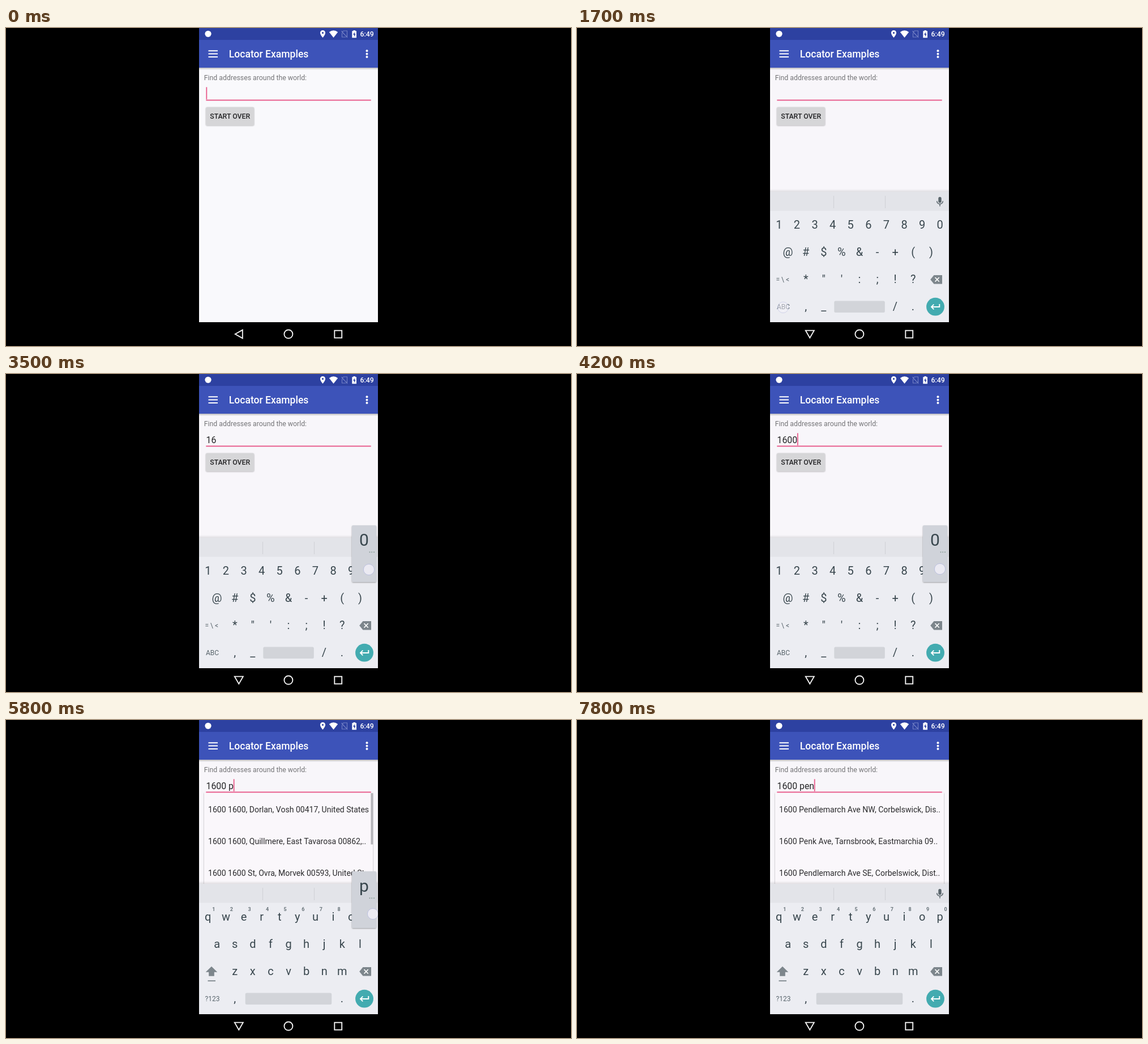
An HTML page that plays this animation: 998x561 px, repeating every 8000 ms.

```html
<!DOCTYPE html>
<html lang="en">
<head>
<meta charset="utf-8">
<title>Address search</title>
<style>
  html, body { margin: 0; width: 100%; height: 100%; overflow: hidden; background: #000; }
  svg { display: block; }
  text { font-family: Roboto, sans-serif; white-space: pre; }
  .mid { text-anchor: middle; }
  .key { font-size: 20px; fill: #38464d; }
  .small { font-size: 12px; fill: #59656c; }
  .hint { font-size: 9px; font-weight: 700; fill: #69747a; }
  .row { font-size: 14.04px; fill: #2b2b2d; }
</style>
</head>
<body>
<svg id="stage" width="998" height="561" viewBox="0 0 998 561">
  <defs>
    <clipPath id="phone"><rect x="341" width="316" height="561"/></clipPath>
    <clipPath id="listClip"><rect x="341" y="126" width="316" height="163"/></clipPath>
    <clipPath id="keyClip"><rect x="341" y="270" width="316" height="249"/></clipPath>
    <linearGradient id="down" x2="0" y2="1">
      <stop stop-opacity=".25"/><stop offset="1" stop-opacity="0"/>
    </linearGradient>
    <linearGradient id="up" x2="0" y2="1">
      <stop stop-opacity="0"/><stop offset="1" stop-opacity=".1"/>
    </linearGradient>
    <filter id="shadow" x="-20%" y="-20%" width="140%" height="140%">
      <feDropShadow dx="0" dy="1" stdDeviation="1.2" flood-opacity=".35"/>
    </filter>
  </defs>
  <g clip-path="url(#phone)">
    <rect id="page" x="341" y="70" width="316" height="449"/>
    <rect x="341" y="70" width="316" height="4" fill="url(#down)"/>
    <rect x="341" y="20" width="316" height="50" fill="#3d53b9"/>
    <rect x="341" width="316" height="21" fill="#2d41a1"/>

    <g fill="#fff">
      <circle cx="357" cy="10.3" r="5.6"/>
      <path fill-rule="evenodd" d="M559.5 4a4.6 4.6 0 0 0-4.6 4.6c0 3.4 4.6 8.6 4.6 8.6s4.600-5.200 4.600-8.600a4.600 4.600 0 0 0-4.600-4.600zm0 3a1.600 1.600 0 1 1 0 3.200a1.600 1.600 0 0 1 0-3.200z"/>
      <path d="M570.800 7.200Q578.500 1.400 586.200 7.200L578.500 17z"/>
      <path fill-rule="evenodd" d="M613.500 5.200V4h3.400v1.200h2.100V17.200h-7.700V5.200zm2.300 2l-2.800 4.600h1.900v3.600l2.700-4.800h-1.800z"/>
      <path d="M357.500 39.300h16.500v2h-16.500zm0 5.300h16.500v2h-16.500zm0 5.300h16.500v2h-16.500z"/>
      <circle cx="637.500" cy="40.300" r="2"/><circle cx="637.500" cy="45.700" r="2"/><circle cx="637.500" cy="51.100" r="2"/>
      <text x="625.600" y="15" font-size="12.300" font-weight="500">6:49</text>
      <text x="393.800" y="52" font-size="17.550" font-weight="500">Locator Examples</text>
    </g>
    <path d="M593.500 7l3-2h6v11l-9-9zM592.500 5l10.500 12M593.500 9v7h7" fill="none" stroke="#7582c6" stroke-width="1.100"/>

    <text x="349.800" y="92" font-size="12.300" fill="#747477">Find addresses around the world:</text>
    <rect x="353.200" y="139.500" width="84.800" height="31.800" rx="1.800" fill="#d6d6d8" filter="url(#shadow)"/>
    <text class="mid" x="395.700" y="160.200" font-size="12.300" font-weight="500" fill="#242426">START OVER</text>
    <g clip-path="url(#listClip)"><g id="list">
      <rect x="350" y="128" width="298" height="180" fill="#faf7fb" filter="url(#shadow)"/>
      <rect id="bar" x="644.500" y="129" width="3.700" height="90.500" fill="#b4b3b8"/>
    </g></g>
    <rect x="353.300" y="126.400" width="291.400" height="1.900" fill="#e85a8a"/>
    <text id="entry" x="353.600" y="121.600" font-size="15.800" fill="#242426"></text>
    <rect id="caret" y="104.300" width="1.800" height="21.500" fill="#e85a8a"/>

    <g clip-path="url(#keyClip)"><g id="board">
      <rect x="341" y="284" width="316" height="5" fill="url(#up)"/>
      <rect x="341" y="289" width="316" height="34" fill="#e3e4e9"/>
      <rect x="341" y="322.500" width="316" height="220" fill="#ecedf2"/>
      <path d="M453.500 296v22M544.500 296v22" stroke="#cfd1d6"/>
      <rect x="638.300" y="298" width="5.400" height="10.400" rx="2.700" fill="#59646a"/>
      <path d="M635.700 305.200a5.300 5.300 0 0 0 10.600 0M641 310.600v4" fill="none" stroke="#59646a" stroke-width="1.500"/>
      <g id="letters">
        <path d="M363 434.800l10.300 10h-5.500v7h-9.600v-7h-5.500z" fill="#7d868c"/>
        <rect x="356.500" y="459.300" width="13.500" height="1.800" fill="#7d868c"/>
      </g>
      <g id="symbols"></g>
      <path d="M630.500 436h14.500v15.500h-14.500l-6.300-7.750z" fill="#7d868c"/>
      <path d="M632.500 440l7.200 7.500m0-7.500l-7.200 7.500" stroke="#fff" stroke-width="1.700"/>
      <circle cx="633" cy="491.700" r="15.900" fill="#43abb0"/>
      <path d="M640.300 487v5h-14m4-4.300l-4.300 4.300l4.300 4.300" fill="none" stroke="#fff" stroke-width="1.900"/>
    </g></g>
    <g id="popup">
      <rect width="43" height="100" rx="2" fill="#d0d3da" filter="url(#shadow)"/>
      <text id="big" class="mid" x="21.500" y="36" font-size="30" fill="#38464d"></text>
      <g fill="#8a9d98"><circle cx="31.500" cy="47.200" r="1"/><circle cx="35.200" cy="47.200" r="1"/><circle cx="39" cy="47.200" r="1"/></g>
    </g>
    <circle id="touch" r="9.600" fill="#f5f3fb" fill-opacity=".72" stroke="#b4b9de" stroke-opacity=".8"/>
  </g>
  <g fill="none" stroke="#f2f2f2" stroke-width="1.900">
    <path id="back"/>
    <circle cx="498.900" cy="540" r="7.500"/>
    <rect x="580.300" y="533.700" width="12.900" height="12.900"/>
  </g>
</svg>
<script>
const LOOP = 8000, STEP = 100, PITCH = 31.6;
const $ = id => document.getElementById(id);
const set = (el, attrs) => { for (const k in attrs) el.setAttribute(k, attrs[k]); };
function add(parent, tag, attrs, text) {
  const el = document.createElementNS('http://www.w3.org/2000/svg', tag);
  set(el, attrs);
  if (text) el.textContent = text;
  return parent.appendChild(el);
}

const label = (g, text, x, y, cls = 'key') => add(g, 'text', { class: 'mid ' + cls, x, y }, text);
const keyRow = (g, keys, x, y) => [...keys].forEach((k, i) => label(g, k, x + i * PITCH, y));
function layout(g, rows, mode, spaceX, spaceW) {
  rows.forEach((keys, i) => keyRow(g, keys, 356.8 + [0, .5, 1.5][i] * PITCH, 354 + 48 * i));
  label(g, mode, 364.5, 496, 'small');
  label(g, ',', 404.2, 498);
  label(g, '.', 593.5, 498);
  return add(g, 'rect', { x: spaceX, y: 481.5, width: spaceW, height: 20.5, rx: 2.5, fill: '#d2d4d9' });
}
const letters = $('letters'), symbols = $('symbols');
layout(letters, ['qwertyuiop', 'asdfghjkl', 'zxcvbnm'], '?123', 422.7, 152.5);
[...'1234567890'].forEach((d, i) => label(letters, d, 366.8 + i * PITCH, 337.3, 'hint'));
const space = layout(symbols, ['1234567890', '@#$%&-+()', '*"\':;!?'], 'ABC', 454.3, 89.5);
label(symbols, '= \\ <', 363.3, 447.5, 'small');
label(symbols, '_', 435.8, 498);
label(symbols, '/', 562, 498);

const typed = [[-200, ''], [2400, '1'], [3000, '16'], [3600, '160'], [4200, '1600'],
  [5100, '1600 '], [5800, '1600 p'], [6600, '1600 pe'], [7700, '1600 pen']];

const results = [
  [4500, ['1600 1600, Dorlan, Vosh 00417, United States',
    '1600 1600, Quillmere, East Tavarosa 00862,..',
    '1600 1600 St, Ovra, Morvek 00593, United St..']],
  [6000, ['1600 Pelmarrow St NE, Vandira, Belisia 0030..',
    'Peatonal Tulio Verdillo Olmezquín 1600, Cent..',
    '1600 Pendlemarch Ave NW, Corbelswick, Dis..']],
  [7800, ['1600 Pendlemarch Ave NW, Corbelswick, Dis..',
    '1600 Penk Ave, Tarnsbrook, Eastmarchia 09..',
    '1600 Pendlemarch Ave SE, Corbelswick, Dist..']]
];
const rows = [0, 1, 2].map(i => add($('list'), 'text', { class: 'row', x: 357, y: 162.7 + 56 * i }));

// down, up, gone, touch x, touch y, key, key centre x, key centre y
const taps = [
  [600, 800, 900, 498, 115],
  [1500, 1700, 1800, 364, 493],
  [2300, 2500, 2500, 357, 345, '1', 357, 347],
  [2900, 3100, 3100, 515, 346, '6', 515, 347],
  [3500, 3800, 3900, 641, 345, '0', 641, 347],
  [4100, 4300, 4400, 641, 344, '0', 641, 347],
  [5000, 5100, 5200, 499, 492],
  [5800, 5900, 6000, 648, 342, 'p', 641, 347],
  [6400, 6600, 6700, 422, 350, 'e', 420, 347],
  [7600, 7800, 7800, 562, 443, 'n', 562, 443]
];

const last = (table, t) => table.filter(e => e[0] <= t).pop();
const clamp = (v, lo = 0, hi = 1) => Math.min(hi, Math.max(lo, v));
const show = (el, on) => el.style.display = on ? '' : 'none';

function draw(t) {
  set($('page'), { fill: t < 1300 ? '#f9f9fc' : '#f8f6fa' });

  const [since, text] = last(typed, t);
  $('entry').textContent = text;
  const end = text ? $('entry').getComputedTextLength() : 0;
  set($('caret'), { x: 353.4 + end });
  show($('caret'), Math.floor((t - since) / 500) % 2 === 0);

  const rise = clamp((t - 650) / 350);
  const left = (1 - rise) ** 2;
  set($('board'), { transform: `translate(0 ${24 * left * (1 - rise * .5)})`, opacity: clamp(rise * 1.6) });
  show($('board'), rise > 0);
  const sym = t >= 1700 && t < 5100;
  show(symbols, sym);
  show(letters, !sym);
  set(space, { fill: t >= 5000 ? '#c3c6cc' : '#d2d4d9' });
  set($('back'), { d: t < 800 ? 'M404.800 540L417.800 532.600V547.400z' : 'M403.800 533.600H418.800L411.300 546.600z' });

  const found = last(results, t);
  show($('list'), found);
  if (found) {
    rows.forEach((r, i) => r.textContent = found[1][i]);
    set($('list'), { opacity: clamp((t - 4400) / 200) });
    set($('bar'), { opacity: 1 - clamp((t - 5800) / 250) });
  }

  const tap = taps.find(p => t >= p[0] && t < p[2]);
  show($('touch'), tap);
  show($('popup'), tap && tap[5] && t < tap[1]);
  if (!tap) return;
  const [, up, , cx, cy, key, kx, ky] = tap;
  set($('touch'), { cx, cy, opacity: t < up ? 1 : .65 });
  if (key) {
    $('big').textContent = key;
    set($('popup'), { transform: `translate(${clamp(kx - 21.5, 344, 611)} ${ky - 80})` });
  }
}

const start = performance.now();
(function tick() {
  const t = (performance.now() - start) % LOOP;
  draw(Math.floor(t / STEP) * STEP);
  requestAnimationFrame(tick);
})();
</script>
</body>
</html>
```
